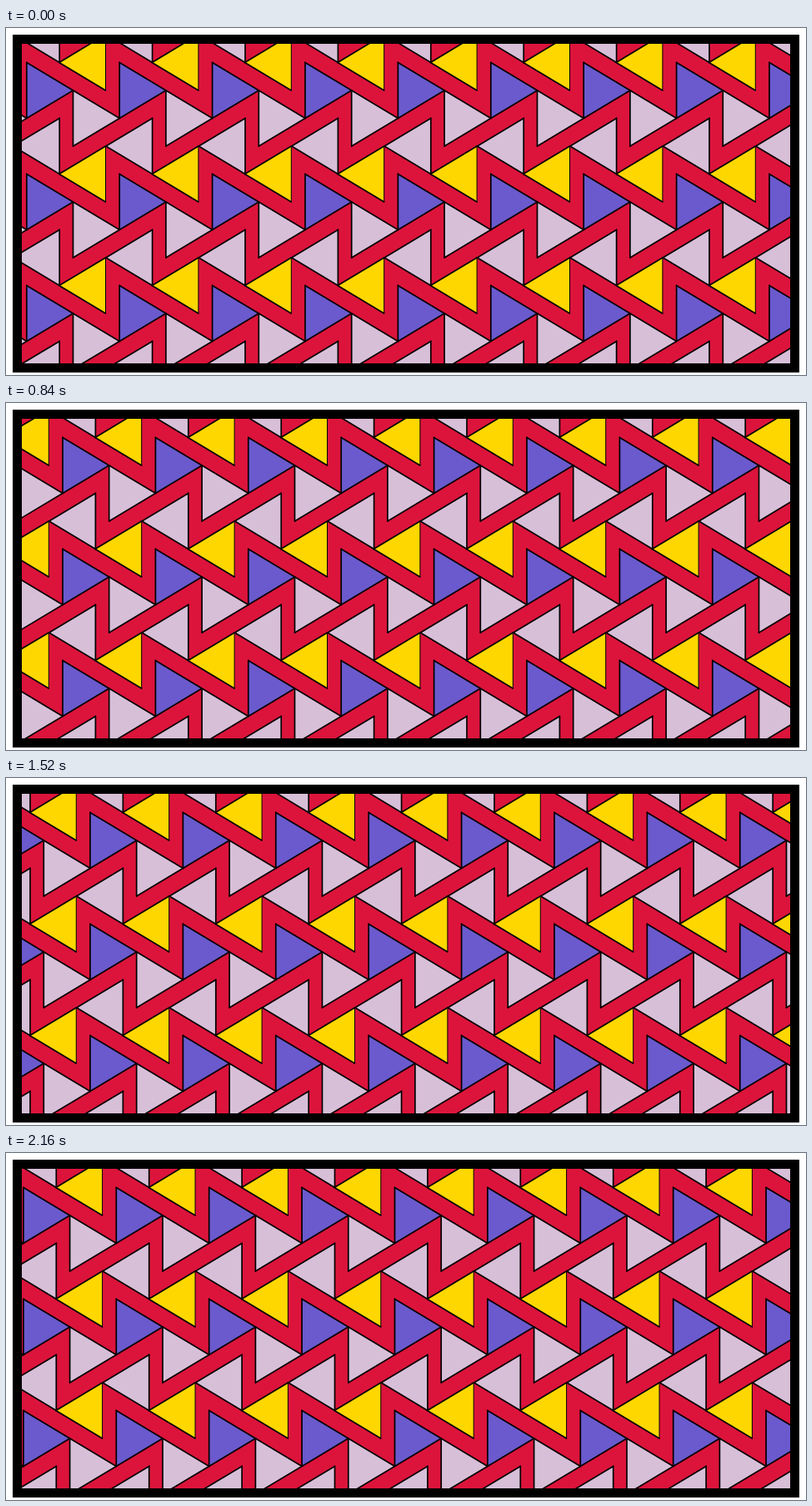
Animation of 960 by 417 pixels, one loop 2.2 s. Source, as an HTML page with a canvas:

```html
<!DOCTYPE html>
<html lang="en">
<head>
<meta charset="utf-8">
<title>Sliding triangles</title>
<style>
html, body { margin: 0; width: 100%; height: 100%; overflow: hidden; background: #fff; }
canvas { display: block; }
</style>
</head>
<body>
<canvas id="stage" width="960" height="417"></canvas>
<script>
const ctx = document.getElementById('stage').getContext('2d');
const LOOP = 2200, STEP = 40;
const W = 111.4, H = 134;          // tile size
const HALF = W / 2, Q = H / 4;     // triangle width and half its height
const LINE = 1.7;

// Slide distance over time: [ms, px]
const PATH = [[0, 0], [280, 15], [600, 30], [840, 43.2], [1280, 64], [1800, 90.4], [2160, 107.5], [2200, W]];

// Vertical edge x, top y, direction of the tip, fill, weight of the vertical edge
const TILE = [
  [24.8, 41.4, 1, '#6a5acd', LINE],
  [80.5, 41.4 + Q, 1, '#d8bfd8', LINE],
  [64.2, 41.4 + 2 * Q, -1, '#d8bfd8', LINE],
  [119.5, 41.4 + 3 * Q, -1, '#ffd700', 1]
];

function slide(t) {
  let i = 1;
  while (t > PATH[i][0]) i++;
  const [t0, x0] = PATH[i - 1], [t1, x1] = PATH[i];
  return x0 + (x1 - x0) * (t - t0) / (t1 - t0);
}

function triangle(x, y, dir, fill, edge) {
  ctx.beginPath();
  ctx.moveTo(x, y);
  ctx.lineTo(x + dir * HALF, y + Q);
  ctx.lineTo(x, y + 2 * Q);
  ctx.fillStyle = fill;
  ctx.fill();
  ctx.lineWidth = LINE;
  ctx.stroke();
  ctx.beginPath();
  ctx.moveTo(x, y);
  ctx.lineTo(x, y + 2 * Q);
  ctx.lineWidth = edge;
  ctx.stroke();
}

function draw(t) {
  const shift = slide(t);
  ctx.fillStyle = '#fff';
  ctx.fillRect(0, 0, 960, 417);
  ctx.fillStyle = '#000';
  ctx.fillRect(8, 8, 944, 406);

  ctx.save();
  ctx.beginPath();
  ctx.rect(19, 19, 922, 384);
  ctx.clip();
  ctx.fillStyle = '#dc143c';
  ctx.fillRect(19, 19, 922, 384);
  ctx.strokeStyle = '#000';
  ctx.lineJoin = ctx.lineCap = 'round';
  for (let row = -2; row < 4; row++) {
    for (let col = -3; col < 10; col++) {
      for (const [x, y, dir, fill, edge] of TILE) {
        triangle(x + col * W + shift, y + row * H, dir, fill, edge);
      }
    }
  }
  ctx.restore();
}

function tick() {
  const t = performance.now() % LOOP;
  draw(Math.floor(t / STEP) * STEP);
  requestAnimationFrame(tick);
}
tick();
</script>
</body>
</html>
```
